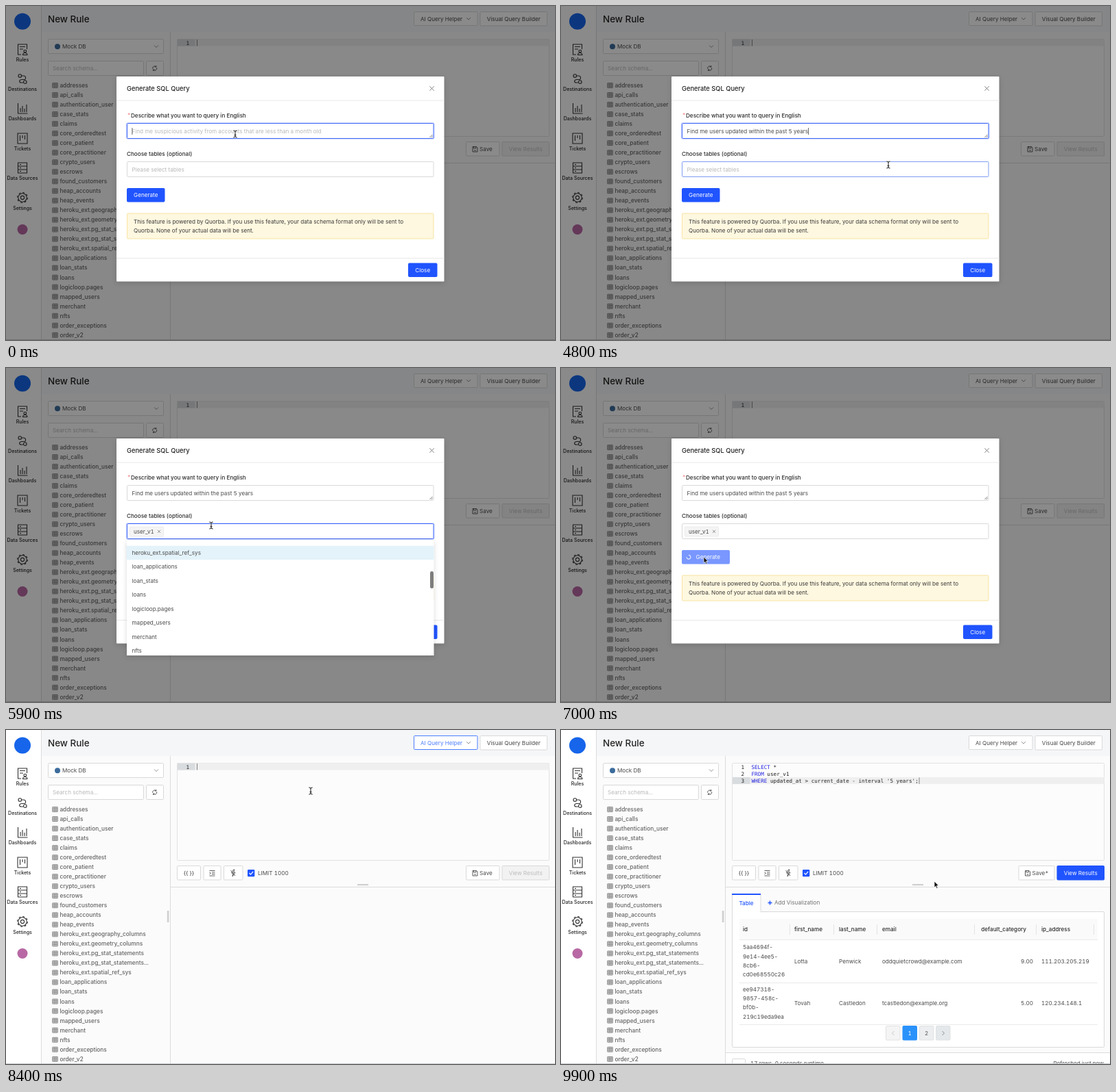
Recreate the animation shown at these times as an HTML page. Size 800 by 488 pixels, loop 10000 ms.

```html
<!DOCTYPE html>
<html lang="en">
<head>
<meta charset="utf-8">
<title>Generate SQL Query</title>
<style>
  html, body { margin: 0; width: 100%; height: 100%; overflow: hidden; background: #fbfbfb; }
  svg { display: block; width: 100vw; height: 100vh; }
  text { font: 8.15px Inter, sans-serif; font-variant-numeric: tabular-nums; fill: #4a4a4a; white-space: pre; }
  .medium { font-weight: 500; fill: #2b2b2b; }
  .title { font-size: 9.3px; font-weight: 500; fill: #222; }
  .page { font-size: 13.45px; font-weight: 500; fill: #222; }
  .nav { font-size: 7.05px; font-weight: 500; fill: #222; text-anchor: middle; }
  .table { font-size: 8.3px; font-weight: 500; fill: #646464; }
  .hint { fill: #b8b8b8; }
  .mid { text-anchor: middle; }
  .end { text-anchor: end; }
  .code { font: 7.64px "DejaVu Sans Mono", monospace; fill: #222; }
  .code .kw { fill: #2222e0; }
  .code .str { fill: #2a2a2a; }
  .dark { fill: #ece6e0; }
  .dark .kw { fill: #b19a95; }
  .dark .op { fill: #a07f66; }
  .dark .str { fill: #cfc5bb; }
  .icon { fill: none; stroke: #333; stroke-width: 1.1; }
  .thin { fill: none; stroke: #777; stroke-width: .8; }
  .sharp { fill: none; stroke: #333; stroke-width: .8; }
  .float { filter: drop-shadow(0 2px 3.7px rgba(0, 0, 0, .15)); }
</style>
</head>
<body>
<svg id="stage" viewBox="0 0 800 488"></svg>
<script>
const BLUE = '#2054ff', LINE = '#dcdcdc';
const PROMPT = 'Find me users updated within the past 5 years';
const TABLES = ('addresses api_calls authentication_user case_stats claims core_orderedtest core_patient ' +
  'core_practitioner crypto_users escrows found_customers heap_accounts heap_events ' +
  'heroku_ext.geography_columns heroku_ext.geometry_columns heroku_ext.pg_stat_statements ' +
  'heroku_ext.pg_stat_statements... heroku_ext.spatial_ref_sys loan_applications loan_stats loans ' +
  'logicloop.pages mapped_users merchant nfts order_exceptions order_v2').split(' ');

const text = (x, y, s, cls = '', attrs = '') => `<text x="${x}" y="${y}" class="${cls}" ${attrs}>${s}</text>`;
const rect = (x, y, w, h, fill = '#fff', stroke = 'none', attrs = '') =>
  `<rect x="${x}" y="${y}" width="${w}" height="${h}" fill="${fill}" stroke="${stroke}" ${attrs}/>`;
const box = (x, y, w, h, fill = '#fff', stroke = '#d9d9d9', attrs = '') =>
  rect(x + .5, y + .5, w - 1, h - 1, fill, stroke, 'rx="1.2" ' + attrs);
const path = (d, cls = 'thin', attrs = '') => `<path d="${d}" class="${cls}" ${attrs}/>`;
const disc = (x, y, r, fill) => `<circle cx="${x}" cy="${y}" r="${r}" fill="${fill}"/>`;
const group = (id, body) => `<g id="${id}">${body}</g>`;
const button = (x, y, w, label, fill, stroke, color, h = 21.5) => box(x, y, w, h, fill, stroke) +
  text(x + w / 2, y + h / 2 + 2.9, label, 'mid', `style="fill:${color}"`);
const primary = (x, y, w, label, h) => button(x, y, w, label, BLUE, BLUE, '#fff', h);
const span = (cls, s) => `<tspan class="${cls}">${s}</tspan>`;
const chevron = (x, y) => path(`M${x - 3} ${y - 1.5}l3 3 3-3`);

const sql = [
  span('kw', 'SELECT') + ' *',
  span('kw', 'FROM') + ' user_v1',
  span('kw', 'WHERE') + ' updated_at ' + span('op', '&gt;') + span('str', " current_date - interval '5 years';")
];

function sidebar() {
  const labels = ['Rules', 'Destinations', 'Dashboards', 'Tickets', 'Data Sources', 'Settings'];
  return rect(0, 0, 52, 488) + path('M51.5 0V488', '', `stroke="${LINE}"`) + disc(24, 22.5, 12, '#1765ea') +
    labels.map((s, i) => text(24, 80.6 + i * 43.4, s, 'nav')).join('') +
    path('M22 71H17.5V56H30.5V63M20 59.5H28M20 63H25M24.5 71.5q0-3 3.2-3t3.2 3zM26 66a1.8 1.8 0 1 0 3.6 0 1.8 1.8 0 1 0-3.6 0', 'icon') +
    path('M18 102a2.3 2.3 0 1 0 4.6 0 2.3 2.3 0 1 0-4.6 0M25.5 111a2.3 2.3 0 1 0 4.6 0 2.3 2.3 0 1 0-4.6 0M22.6 102h3q3 0 3 3t-3 2.5h-3q-3 .5-3 2.5t3 2h2.5', 'icon') +
    path('M17.5 142V157H31.5M21 155V149M24 155V146M27 155V150M30 155V144', 'icon') +
    path('M17 186H31V201H17zM20.5 189V197M24 189V193M27.5 189V195', 'icon') +
    path('M17.5 229H30.5V244H17.5zM17.5 234H30.5M17.5 239H30.5M20 231.5h2M20 236.5h2M20 241.5h2', 'icon') +
    `<circle cx="24" cy="280" r="6.2" class="icon"/><circle cx="24" cy="280" r="2.6" class="icon"/>
     <circle cx="24" cy="280" r="7.4" class="icon" stroke-dasharray="2.906"/>` +
    disc(24, 326.5, 7.5, '#b868a4');
}

function schema() {
  const row = (s, i) => {
    const y = 116 + i * 14.03;
    return path(`M67.8 ${y - 3.4}h7.4v6.8h-7.4zM67.8 ${y - 1.2}h7.4m0 2.3h-7.4M70.3 ${y - 3.4}v6.8m2.5 0v-6.8`, 'thin', 'style="stroke:#666"') +
      text(78.4, y + 2.9, s, 'table');
  };
  return box(61, 48, 169, 22) + disc(75, 59.3, 4, '#3c6c9c') + text(82, 62, 'Mock DB') + chevron(219, 59) +
    box(61, 80, 140, 22) + text(68, 94, 'Search schema...', 'hint') + box(204, 80, 26, 22) +
    path('M213.8 91.8a3 3 0 0 1 5-3m.8 1.5a3 3 0 0 1-5 3M218.8 87v2h-2M214.6 95v-2h2', 'sharp') +
    TABLES.map(row).join('') +
    path('M239.5 38V488', '', `stroke="${LINE}"`) + rect(234.8, 264, 2.6, 17, '#cfcfcf');
}

function editor() {
  const number = n => text(267, 46.5 + n * 10.2, n, 'code end');
  return box(249, 48, 543, 143, '#fcfcfc', '#e2e2e2') +
    group('activeLine', rect(249.5, 48.5, 542, 10, '#efefef') + rect(249.5, 48.5, 26, 10, '#d9dcde')) + number(1) +
    group('pasted', number(2) + number(3) + sql.map((s, i) => text(277.4, 56.5 + i * 10.2, s, 'code')).join('')) +
    group('editorCaret', rect(278, 49, .8, 9.5, '#666')) +
    button(249, 198, 35, '{{ }}', '#fff', '#d9d9d9', '#333') + box(287.5, 198, 26, 21.5) + box(317, 198, 28.5, 21.5) +
    path('M296.5 205.5h8M300 208h4.5M300 210.5h4.5M296.5 213h8M296.5 207.8l2 1.5-2 1.5', 'sharp') +
    path('M331.5 204l-3 5h2.5l-1 5 4-6h-2.6l1.6-4zM327.5 205l6.5 8', 'sharp') +
    rect(352, 204, 10.3, 10.3, BLUE, 'none', 'rx="1.2"') + path('M354.5 209l2 2.2 3.6-4.4', '', 'fill="none" stroke="#fff" stroke-width="1.2"') +
    text(367, 212.2, 'LIMIT 1000') +
    group('saveClean', saveButton(670, 'Save')) + group('saveDirty', saveButton(666.5, 'Save*')) +
    button(722.5, 198, 69.5, 'View Results', '#f2f2f2', '#d9d9d9', '#bcbcbc') +
    group('viewOn', primary(722.5, 198, 69.5, 'View Results')) +
    path('M240 229.5H800', '', `stroke="${LINE}"`) + rect(512, 225, 16, 2.2, '#cfcfcf');
}

function saveButton(x, label) {
  return box(x, 198, 719.5 - x, 21.5) + text(x + 20, 212, label) +
    path(`M${x + 10} 205.5h5.5l1.5 1.5v6h-7zM${x + 11.5} 205.5v2.4h3.4v-2.4M${x + 12} 211h3`, 'sharp');
}

function results() {
  const head = [[265, 'id'], [340, 'first_name'], [405, 'last_name'], [468, 'email'], [678, 'default_category', 'end'], [700, 'ip_address']];
  const rows = [
    ['5aa4694f- 9e14-4ee5- 8cb6- cd0e68550c26', 'Lotta', 'Penwick', 'oddquietcrowd@example.com', '9.00', '111.203.205.219'],
    ['ee947318- 9857-458c- bf0b- 219c19eda9ea', 'Tovah', 'Castledon', 'tcastledon@example.org', '5.00', '120.234.148.1']
  ];
  const row = (cells, r) => cells.map((s, c) => {
    const y = 340.8 + r * 61.5;
    if (!c) return s.split(' ').map((part, i) => text(265, y - 20.7 + i * 13.4, part)).join('');
    return c === 4 ? text(688, y, s, 'end') : text(head[c][0], y, s);
  }).join('');
  const page = (x, s, fill, stroke, color) => button(x, 432, 21.5, s, fill, stroke, color);
  return box(249, 265, 543, 199) + rect(249.5, 240, 41.5, 26, '#fff', LINE) + rect(249, 239, 42, 2, BLUE) +
    rect(250, 264, 40.5, 3) + text(270, 256, 'Table', 'medium mid', `style="fill:${BLUE}"`) +
    path('M301.5 252.5h6M304.5 249.5v6', '', `stroke="${BLUE}" stroke-width="1.4"`) + text(311, 255.4, 'Add Visualization', '', 'style="fill:#707070"') +
    rect(260, 276, 522, 30, '#fafafa') + path('M260 306.5H782M260 369.5H782M260 430.5H782', '', 'stroke="#eaeaea"') +
    path([333, 397, 460, 602, 692, 776].map(x => `M${x}.5 284V299`).join(''), '', 'stroke="#e4e4e4"') +
    head.map(([x, s, cls = '']) => text(x, 294, s, 'medium ' + cls)).join('') + rows.map(row).join('') +
    page(473, '', '#f4f4f4', '#e2e2e2', '#aaa') + page(497.5, '1', '#2a92fb', '#2a92fb', '#fff') +
    page(522, '2', '#eceef0', '#dfe2e4', '#555') + page(546, '', '#e4e8ea', '#dfe2e4', '#555') +
    path('M485.5 440l-3 3 3 3', 'thin', 'style="stroke:#bbb"') + path('M555.5 440l3 3-3 3') +
    path('M240 471.5H800', '', `stroke="${LINE}"`) + rect(240, 472, 560, 16) + box(249, 480, 20, 20) +
    text(276, 490, '17 rows  0 seconds runtime') + text(791, 490, 'Refreshed just now', 'end');
}

function modal() {
  const top = text(176, 123.7, 'Generate SQL Query', 'title') + path('M617.3 117.3l6.4 6.4m0-6.4l-6.4 6.4', 'thin', 'style="stroke:#666"') +
    path('M161 138H638.5', '', 'stroke="#e8e8e8"') +
    text(176.5, 162.3, '*', '', 'style="fill:#f5787a"') + text(182, 163, 'Describe what you want to query in English', 'medium') +
    group('promptFocus', rect(175, 170.3, 449.5, 24.4, '#c9d5ff', 'none', 'rx="2"')) +
    box(176, 171, 447.5, 23, '#fff', '#d9d9d9', 'id="promptBox"') + path('M617.5 192l4-4M620 192l1.6-1.6', 'thin', 'style="stroke:#555"') +
    group('promptHint', text(183.5, 186, 'Find me suspicious activity from accounts that are less than a month old', 'hint')) +
    text(183.5, 186, '', '', 'id="prompt"') + rect(183.5, 178, .8, 10, '#444', 'none', 'id="promptCaret"') +
    text(176, 219, 'Choose tables (optional)', 'medium') +
    group('tableFocus', rect(175, 226.3, 449.5, 24.4, '#c9d5ff', 'none', 'rx="2"')) +
    box(176, 227, 447.5, 23, '#fff', '#d9d9d9', 'id="tableBox"') +
    group('tableHint', text(183.5, 242, 'Please select tables', 'hint')) + text(183.5, 242, '', '', 'id="search"') +
    group('tag', box(180, 231.5, 50, 15, '#f4f4f4', '#ececec') + text(186, 242, 'user_v1') + path('M221 236.8l4 4m0-4l-4 4')) +
    group('generate', primary(176, 266, 55.5, 'Generate', 20.5)) +
    group('loading', button(176, 266, 70, '   Generate', '#7997ff', '#7997ff', '#fff', 20.5) +
      path('M186 273.3a3 3 0 1 1-3 3', '', 'id="spinner" fill="none" stroke="#fff"')) +
    box(176, 302.5, 447.5, 38, '#fff8e0', '#f7e3a1') +
    text(186, 318, 'This feature is powered by Quorba. If you use this feature, your data schema format only will be sent to', '', 'style="fill:#383838"') +
    text(186, 331, 'Quorba. None of your actual data will be sent.', '', 'style="fill:#383838"');
  const output = text(176, 297, 'Generated Output:', 'medium') + box(176, 305.5, 447.5, 93, '#f4f4f4', '#d2d2d2') +
    rect(183, 316.5, 433.5, 52, '#453529', '#8b6650', 'rx="3" stroke-width="2"') +
    rect(184.5, 318, 430.5, 49, 'none', '#1f1611', 'rx="2" stroke-width="1.4"') +
    sql.map((s, i) => text(192, 334 + i * 11.6, s, 'code dark')).join('') +
    text(182, 381.7, 'copy SQL', 'code') + group('copied', path('M222 379l2.4 2.4 4.6-5', 'thin', 'style="stroke:#555;stroke-width:1.2"'));
  const foot = path('M161 368.5H638.5', '', 'stroke="#e8e8e8"') + primary(586, 375.5, 42.5, 'Close', 20.5);
  return rect(0, 0, 800, 488, '#000', 'none', 'opacity=".46"') + rect(161, 103, 477.5, 299.5, '#fff', 'none', 'id="sheet" class="float" rx="1"') +
    group('top', top) + group('output', output) + group('foot', foot);
}

function dropdown(options, first, height, thumb) {
  return rect(176, 252, 447.5, height, '#fff', 'none', 'class="float"') +
    rect(176, first - 10.2, 447.5, 20.4, '#e4f3fa') +
    options.map((s, i) => text(183.5, first + 2.9 + i * 20.45, s)).join('') +
    (thumb ? rect(618, thumb, 5, 25, '#7d7d7d', 'none', 'rx="2.5"') : '');
}

const matches = [...TABLES.filter(s => s.includes('user')), 'user_v1'];
document.getElementById('stage').innerHTML =
  rect(0, 0, 800, 488, '#fbfbfb') + rect(52, 0, 748, 38, '#f5f6f8') + text(61, 24, 'New Rule', 'page') +
  group('helper', box(594, 8, 93.5, 21) + text(604, 21.6, 'AI Query Helper') + chevron(674, 18.5)) +
  group('helperFocus', box(594, 8, 93.5, 21, '#fff', '#4a7dff') + text(604, 21.6, 'AI Query Helper', '', 'style="fill:#4a7dff"') + chevron(674, 18.5)) +
  button(690.5, 8, 98.5, 'Visual Query Builder', '#fff', '#d9d9d9', '#444') +
  sidebar() + schema() + editor() + group('results', results()) +
  path('M0 487.5H800', '', 'stroke="#c9cdd1"') + group('modal', modal()) +
  group('listFull', dropdown(TABLES.slice(0, 8), 265, 168, 256)) +
  group('listMatches', dropdown(matches, 265, 24 + 20.45 * (matches.length - 1))) +
  group('listScrolled', dropdown(TABLES.slice(17, 25), 270, 168, 297)) +
  group('pointer',
    group('beam', ['stroke="#fff" stroke-width="2.2" opacity=".6"', 'stroke="#111" stroke-width="1"'].map(style =>
      path('M-2.6-5Q0-5 0-3.2V3.2Q0 5-2.6 5M2.6-5Q0-5 0-3.2M2.6 5Q0 5 0 3.2M-1.4 1.6H1.4', '', 'fill="none" ' + style)).join('')) +
    group('arrow', path('M0 0V9L2 7.2 3.4 10.4 4.9 9.7 3.5 6.6H6.3z', '', 'fill="#111" stroke="#fff" stroke-width=".7"')));

const el = {};
document.querySelectorAll('[id]').forEach(node => el[node.id] = node);
const show = (id, on) => { el[id].style.display = on ? '' : 'none'; };
const shift = (id, x, y) => el[id].setAttribute('transform', `translate(${x} ${y})`);

const typing = [[300, 0], [1100, 6], [1900, 13], [2500, 13], [4400, 45]];
const moves = [[4400, 334, 187], [4800, 477, 232], [5000, 470, 236], [5600, 300, 264], [5900, 299, 230], [6500, 208, 276],
  [7300, 208, 276], [7700, 212, 376], [7900, 212, 376], [8200, 711, 338], [8400, 444, 89], [8900, 444, 89],
  [9300, 757, 208], [9500, 757, 208], [9900, 544, 221]];

function sample(keys, t, ease = k => k) {
  const next = keys.findIndex(key => key[0] > t);
  if (next < 1) return (next ? keys[keys.length - 1] : keys[0]).slice(1);
  const a = keys[next - 1], b = keys[next], k = ease((t - a[0]) / (b[0] - a[0]));
  return a.slice(1).map((v, i) => v + (b[i + 1] - v) * k);
}

function draw(t) {
  const within = (from, to) => t >= from && t < to;

  const typed = PROMPT.slice(0, Math.floor(sample(typing, t)[0] + 1e-6));
  el.prompt.textContent = typed;
  show('promptHint', !typed);
  show('promptFocus', t < 5000);
  show('promptCaret', t < 5000 && !within(2400, 2600));
  el.promptBox.setAttribute('stroke', t < 5000 ? '#4068f5' : '#d9d9d9');

  const focused = within(5000, 6600);
  show('tableFocus', focused);
  el.tableBox.setAttribute('stroke', focused ? '#4068f5' : within(4800, 5000) ? '#7f9cf2' : '#d9d9d9');
  el.search.textContent = within(5200, 5600) ? 'user'.slice(0, (t - 5100) / 100) : '';
  show('tableHint', t < 5200);
  show('tag', t >= 5600);
  show('listFull', within(5000, 5200));
  show('listMatches', within(5200, 5600));
  show('listScrolled', within(5600, 6100));

  const loading = within(6700, 7300), grow = t >= 7300 ? 66 : 0;
  show('generate', !loading);
  show('loading', loading);
  el.spinner.setAttribute('transform', `rotate(${t * .36} 186 276.3)`);
  show('output', grow);
  show('copied', t >= 7900);
  shift('top', 0, -grow);
  shift('foot', 0, grow);
  el.sheet.setAttribute('y', 103 - grow);
  el.sheet.setAttribute('height', 299.5 + 2 * grow);
  show('modal', t < 8400);
  el.modal.style.opacity = t < 8300 ? 1 : .5;

  const pasted = t >= 8900;
  show('helper', !within(8300, 8800));
  show('helperFocus', within(8300, 8800));
  show('pasted', pasted);
  show('viewOn', pasted);
  show('saveClean', !pasted);
  show('saveDirty', pasted);
  shift('activeLine', 0, pasted ? 20.4 : 0);
  shift('editorCaret', pasted ? 243.6 : 0, pasted ? 20.4 : 0);
  show('results', t >= 9500);

  const beam = t < 6100 || within(8400, 9000);
  shift('pointer', ...sample(moves, t, k => k * k * (3 - 2 * k)));
  show('pointer', !within(300, 4400));
  show('beam', beam);
  show('arrow', !beam);

  const width = typed ? el.prompt.getComputedTextLength() : 0;
  el.promptCaret.setAttribute('x', 183.5 + width);
}

const start = performance.now();
function tick() {
  const elapsed = (performance.now() - start) % 10000;
  draw(Math.floor(elapsed / 100) * 100);
  requestAnimationFrame(tick);
}
tick();
</script>
</body>
</html>
```
